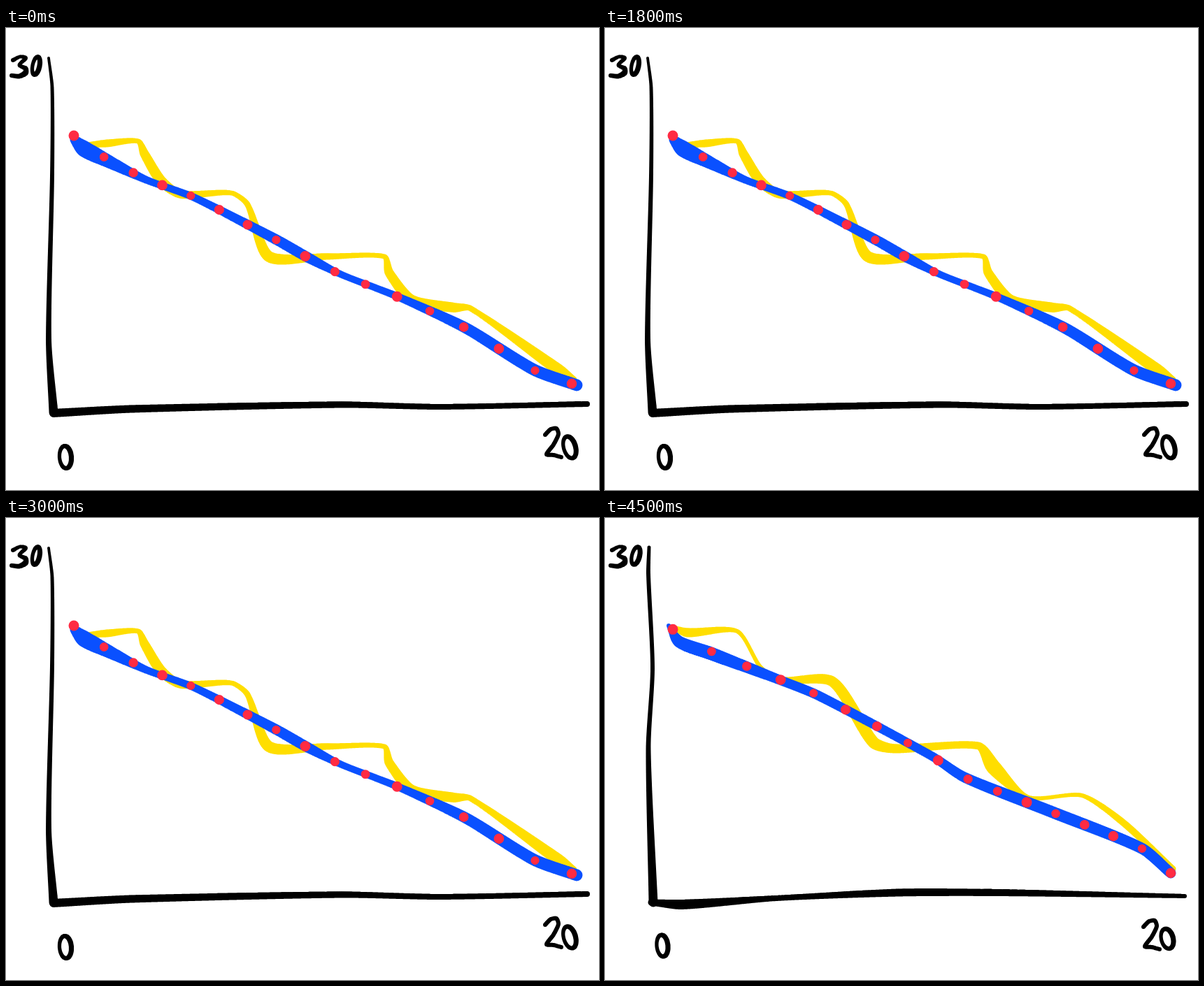
Animation of 848 by 661 pixels, one loop 4.8 s. Source, as an HTML page with a canvas:

```html
<!DOCTYPE html>
<html lang="en">
<head>
<meta charset="utf-8">
<title>Hand-drawn chart</title>
<style>
html, body { margin: 0; width: 100%; height: 100%; overflow: hidden; background: #fff; }
canvas { display: block; width: 100vw; height: 100vh; }
</style>
</head>
<body>
<canvas id="stage" width="848" height="661"></canvas>
<script>
const ctx = document.getElementById('stage').getContext('2d');
const HOLD = 300, DOTS = 17, TENSION = 0.75;
const BLACK = '#000', YELLOW = '#ffde00', BLUE = '#0a50ff', RED = '#ff2b43';

const parse = s => s.split(' ').map(p => p.split(',').map(Number));

// Smooth curve through key points of x, y and brush width, sampled every pixel.
function curve(pts) {
  const at = [0], out = [];
  for (let i = 1; i < pts.length; i++) {
    at[i] = at[i - 1] + Math.hypot(pts[i][0] - pts[i - 1][0], pts[i][1] - pts[i - 1][1]);
  }
  const slope = (i, k) => {
    const a = Math.max(i - 1, 0), b = Math.min(i + 1, pts.length - 1);
    return TENSION * (pts[b][k] - pts[a][k]) / (at[b] - at[a]);
  };
  for (let i = 0; i < pts.length - 1; i++) {
    const len = at[i + 1] - at[i], steps = Math.ceil(len);
    for (let n = 0; n <= steps; n++) {
      const u = n / steps, v = 1 - u;
      out.push([0, 1, 2].map(k =>
        pts[i][k] * (1 + 2 * u) * v * v + pts[i + 1][k] * u * u * (3 - 2 * u) +
        len * u * v * (slope(i, k) * v - slope(i + 1, k) * u)));
    }
  }
  return out;
}

function brush(samples) {
  const path = new Path2D();
  for (const [x, y, w] of samples) {
    path.moveTo(x + w / 2, y);
    path.arc(x, y, w / 2, 0, Math.PI * 2);
  }
  return path;
}

// A tilted loop, heavier on its right side.
function zero(cx, cy, rx, ry, tilt) {
  const pts = [], c = Math.cos(tilt), s = Math.sin(tilt);
  for (let i = 0; i <= 16; i++) {
    const a = i / 8 * Math.PI, x = rx * Math.cos(a), y = ry * Math.sin(a);
    pts.push([cx + x * c - y * s, cy + x * s + y * c, 6.3 + Math.cos(a)]);
  }
  return pts;
}

const glyph = (shape, x, y) => parse(shape).map(([px, py, w]) => [x + px, y + py, w]);
const three = (x, y) => glyph('2,5,6 12,0,5 20,2,6 11,12,5 20,17,7 20,23,8 11,28,7 0,27,6', x, y);
const two = (x, y) => glyph('0,9,6 8,1,6 16,0,6 19,8,6 12,23,6 2,37,6 12,38,6 23,41,6', x, y);

// Dots ride on the line; their spacing bows away from even by a skewed sine.
function dots(line, bow, skew) {
  const path = new Path2D();
  for (let i = 0; i < DOTS; i++) {
    const u = i / (DOTS - 1);
    const x = 97 + 712 * u + bow * Math.sin(Math.PI * u ** skew);
    const y = (line.find(p => p[0] >= x) || line[line.length - 1])[1] - 6 * (1 - u) ** 9;
    const r = 6.8 + 0.7 * Math.cos(i * 2.3);
    path.moveTo(x + r, y);
    path.arc(x, y, r, 0, Math.PI * 2);
  }
  return path;
}

const poses = [
  {
    ink: [
      parse('61,43,4 66,85,5 66,210,6 61,445,8 68,550,13'),
      parse('68,551,12 180,545,11 480,539,9 620,542,8 831,538,8'),
      three(8, 41), zero(43, 54, 5, 13, 0.2),
      zero(85, 614, 8.5, 16, -0.08),
      two(771, 573), zero(806, 600, 8.5, 16, -0.28)
    ],
    yellow: '120,167,8 145,165,11 189,162,7 198,180,13 222,219,15 250,238,12 322,236,7 345,252,8 376,327,16 460,327,9 541,327,7 548,350,13 580,389,15 640,400,14 664,401,8 790,489,17 812,503,9',
    blue: '98,160,13 112,173,23 145,190,19 200,217,11 268,242,11 385,302,15 431,328,15 480,353,10 557,383,11 657,429,16 755,489,17 816,511,17',
    bow: -28, skew: 1.5
  },
  {
    ink: [
      parse('63,42,5 62,80,6 68,215,6 62,330,7 69,550,13'),
      parse('66,550,9 110,553,14 245,544,8 420,536,11 560,536,10 829,541,6'),
      three(8, 41), zero(44, 54, 5.5, 13, 0.25),
      zero(82, 612, 8, 15.5, -0.1),
      two(770, 576), zero(804, 602, 8.5, 14.5, -0.25)
    ],
    yellow: '95,156,6 118,164,13 189,162,6 222,213,6 248,232,9 325,234,15 384,321,17 415,330,13 534,326,11 556,357,21 605,400,7 682,397,6 740,435,10 812,502,9',
    blue: '91,154,6 106,177,17 152,194,19 248,231,14 305,254,14 468,341,13 514,371,15 640,421,17 768,473,16 809,508,15',
    bow: 25, skew: 0.7
  }
];

const drawings = poses.map(p => {
  const line = curve(parse(p.blue));
  return [
    ...p.ink.map(pts => [BLACK, brush(curve(pts))]),
    [YELLOW, brush(curve(parse(p.yellow)))],
    [BLUE, brush(line)],
    [RED, dots(line, p.bow, p.skew)]
  ];
});

function draw(pose) {
  ctx.fillStyle = '#fff';
  ctx.fillRect(0, 0, 848, 661);
  for (const [color, path] of drawings[pose]) {
    ctx.fillStyle = color;
    ctx.fill(path);
  }
}

const start = performance.now();
function tick() {
  draw(Math.floor((performance.now() - start) / HOLD) % 2);
  requestAnimationFrame(tick);
}
tick();
</script>
</body>
</html>
```
